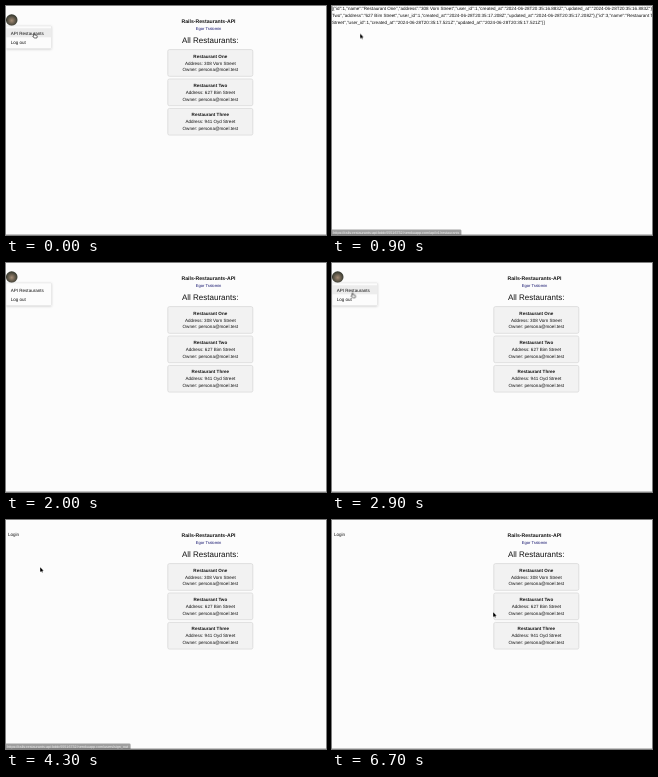
These frames come from a looping animation (320x229 px, 6.8 s). An HTML page:

```html
<!DOCTYPE html>
<html lang="en">
<head>
<meta charset="utf-8">
<title>Rails-Restaurants-API</title>
<style>
html, body { margin: 0; width: 100%; height: 100%; overflow: hidden; background: #fcfcfc; }
svg { display: block; width: 100%; height: 100%; }
text { font: 4.55px "Liberation Sans", Arial, sans-serif; fill: #111; text-rendering: geometricPrecision; white-space: pre; }
.mid { text-anchor: middle; }
.bold { font-weight: bold; }
.title { font-size: 5.15px; }
.author { font-size: 4.1px; fill: #15156e; }
.heading { font-size: 8px; }
.card { fill: #f2f2f2; stroke: #d6d6d6; stroke-width: .7; }
.hover { fill: #ececec; }
.status rect { fill: #2e2e2e; }
.status text { font-size: 3.7px; fill: #ddd; }

/* 6.8 s loop; the picture advances every 100 ms */
.json, .menu, .login, .hover, .status, .hand, .arrow, .cursor { animation: 6.8s step-end infinite; }
.json { animation-name: json; }
.menu { animation-name: menu; }
.login { animation-name: login; }
.api { animation-name: api; }
.out { animation-name: out; }
.status.s1 { animation-name: status1; }
.status.s2 { animation-name: status2; }
.hand { animation-name: hand; }
.arrow { animation-name: arrow; }
.cursor { animation-name: move; }

@keyframes json { 0%, 27.94%, 100% { opacity: 0 } 5.88% { opacity: 1 } }
@keyframes menu { 0% { opacity: 1 } 58.82%, 100% { opacity: 0 } }
@keyframes login { 0% { opacity: 0 } 58.82%, 100% { opacity: 1 } }
@keyframes api { 0%, 39.7% { opacity: 1 } 5.88%, 44.11%, 100% { opacity: 0 } }
@keyframes out { 0%, 58.82%, 100% { opacity: 0 } 44.11% { opacity: 1 } }
@keyframes status1 {
  0%, 16.17%, 100% { opacity: 0 }
  2.94% { opacity: .6 }
  4.41% { opacity: 1 }
  13.23% { opacity: .45 }
  14.7% { opacity: .1 }
}
@keyframes status2 {
  0%, 64.7%, 100% { opacity: 0 }
  44.11% { opacity: .6 }
  45.58% { opacity: 1 }
  61.76% { opacity: .8 }
  63.23% { opacity: .45 }
}
@keyframes hand { 0%, 39.7% { opacity: 1 } 5.88%, 58.82%, 100% { opacity: 0 } }
@keyframes arrow { 0%, 39.7% { opacity: 0 } 5.88%, 58.82%, 100% { opacity: 1 } }
@keyframes move {
  0% { transform: translate(28px, 27px) }
  13.23% { transform: translate(28px, 27.5px); animation-timing-function: steps(6) }
  22.05% { transform: translate(11px, -5px) }
  23.52% { transform: translate(11px, -5.2px) }
  25% { transform: translate(12px, -9px) }
  30.88% { transform: translate(12px, -9px); animation-timing-function: steps(4) }
  36.76% { transform: translate(21px, 15px); animation-timing-function: steps(6) }
  45.58% { transform: translate(20px, 37px) }
  55.88% { transform: translate(20px, 37px); animation-timing-function: steps(3) }
  60.29% { transform: translate(34px, 46px) }
  63.23% { transform: translate(34px, 47px); animation-timing-function: steps(5) }
  70.58% { transform: translate(123px, 107px); animation-timing-function: steps(3) }
  74.99% { transform: translate(154px, 89px); animation-timing-function: steps(4) }
  80.88% { transform: translate(105px, 93px) }
  83.82% { transform: translate(105px, 93.5px) }
  86.76% { transform: translate(105px, 93.5px); animation-timing-function: steps(3) }
  91.17% { transform: translate(58px, 63px); animation-timing-function: steps(4) }
  97.05% { transform: translate(147px, 88px) }
  98.52%, 100% { transform: translate(161px, 92px) }
}
</style>
</head>
<body>
<svg viewBox="0 0 320 229">
  <defs>
    <radialGradient id="photo" cy=".55">
      <stop offset="0" stop-color="#a58d76"/>
      <stop offset=".5" stop-color="#6d6252"/>
      <stop offset="1" stop-color="#373a30"/>
    </radialGradient>
    <filter id="shadow" x="-10%" y="-20%" width="120%" height="150%">
      <feDropShadow dx="0" dy=".6" stdDeviation=".8" flood-opacity=".2"/>
    </filter>
  </defs>

  <rect width="320" height="229" fill="#fcfcfc"/>

  <text class="mid bold title" x="202.5" y="17">Rails-Restaurants-API</text>
  <text class="mid author" x="202.5" y="23.5">Egor Tralomin</text>
  <text class="mid heading" x="204.2" y="36.7">All Restaurants:</text>

  <g class="mid">
    <rect class="card" x="161.8" y="43.6" width="85" height="26.7" rx="1.6"/>
    <text class="bold" x="204.3" y="51.7">Restaurant One</text>
    <text x="204.3" y="58.7">Address: 308 Vorn Street</text>
    <text x="204.3" y="65.4">Owner: persona@moel.test</text>
  </g>
  <g class="mid" transform="translate(0 29.4)">
    <rect class="card" x="161.8" y="43.6" width="85" height="26.7" rx="1.6"/>
    <text class="bold" x="204.3" y="51.7">Restaurant Two</text>
    <text x="204.3" y="58.7">Address: 627 Bim Street</text>
    <text x="204.3" y="65.4">Owner: persona@moel.test</text>
  </g>
  <g class="mid" transform="translate(0 58.8)">
    <rect class="card" x="161.8" y="43.6" width="85" height="26.7" rx="1.6"/>
    <text class="bold" x="204.3" y="51.7">Restaurant Three</text>
    <text x="204.3" y="58.7">Address: 941 Oyd Street</text>
    <text x="204.3" y="65.4">Owner: persona@moel.test</text>
  </g>

  <g class="menu">
    <circle cx="5.7" cy="14" r="5.8" fill="url(#photo)"/>
    <rect x="0" y="20" width="45.3" height="22.5" fill="#fcfcfc" stroke="#ddd" stroke-width=".4" filter="url(#shadow)"/>
    <rect class="hover api" x="0" y="22.3" width="45.3" height="9"/>
    <rect class="hover out" x="0" y="31.3" width="45.3" height="9"/>
    <text x="4.7" y="28.6">API Restaurants</text>
    <text x="4.7" y="37.6">Log out</text>
  </g>
  <text class="login" x="2" y="15.8">Login</text>

  <g class="json">
    <rect width="320" height="229" fill="#fdfdfd"/>
    <text x="-.3" y="4.2">[{"id":1,"name":"Restaurant One","address":"308 Vorn Street","user_id":1,"created_at":"2024-06-28T20:35:16.883Z","updated_at":"2024-06-28T20:35:16.883Z"},{"id":2,"name":"Restaurant</text>
    <text x="0" y="11">Two","address":"627 Bim Street","user_id":1,"created_at":"2024-06-28T20:35:17.208Z","updated_at":"2024-06-28T20:35:17.208Z"},{"id":3,"name":"Restaurant Three","address":"941 Oyd</text>
    <text x="0" y="17.8">Street","user_id":1,"created_at":"2024-06-28T20:35:17.521Z","updated_at":"2024-06-28T20:35:17.521Z"}]</text>
  </g>

  <rect y="228" width="320" height="1" fill="#c4c4c4"/>

  <g class="status s1">
    <path d="M0 223.4H128a1.4 1.4 0 0 1 1.4 1.4V229H0z" fill="#2e2e2e"/>
    <text x="1.3" y="227.5">https://rails-restaurants-api-bddc55516732.herokuapp.com/api/v1/restaurants</text>
  </g>
  <g class="status s2">
    <path d="M0 223.4H123.2a1.4 1.4 0 0 1 1.4 1.4V229H0z" fill="#2e2e2e"/>
    <text x="1.3" y="227.5">https://rails-restaurants-api-bddc55516732.herokuapp.com/users/sign_out</text>
  </g>

  <g class="cursor">
    <path class="arrow" d="M.2 .2V5L1.3 4 2 5.6 2.8 5.2 2.1 3.7H3.6z" fill="#000" stroke="#fff" stroke-width=".5" paint-order="stroke"/>
    <path class="hand" d="M-.3 .6q.5-.8 1 0V2l2 .4q.6.2.5.9L2.9 5H.2L-1.3 3.2q.1-.7 1 0z" fill="#fff" stroke="#111" stroke-width=".6" stroke-linejoin="round"/>
  </g>
</svg>
</body>
</html>
```
